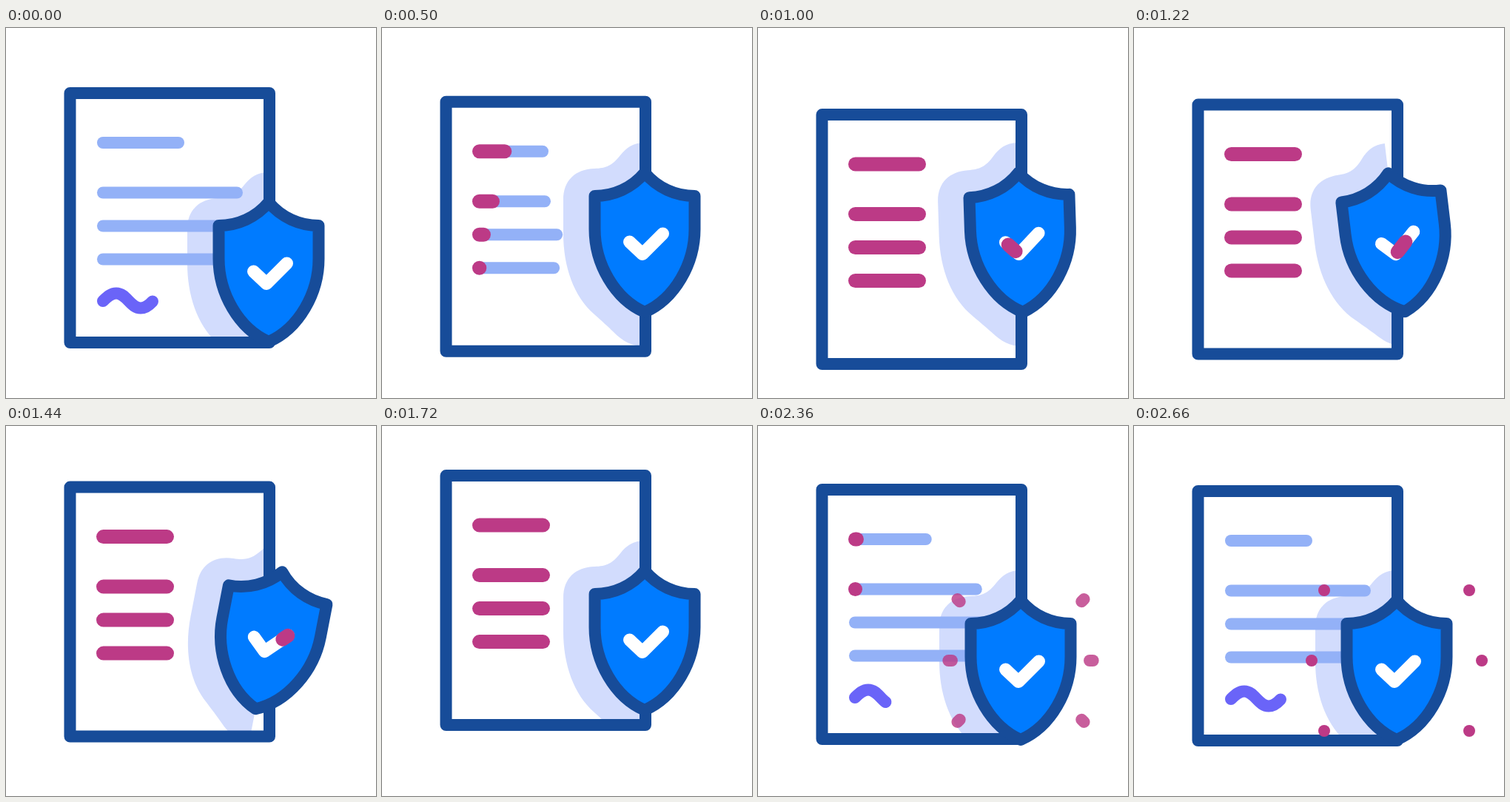
These frames come from a looping animation (500x500 px, 2680 ms). An HTML page:

```html
<!DOCTYPE html>
<html lang="en">
<head>
<meta charset="utf-8">
<title>Protected document</title>
<style>
  html, body { margin: 0; width: 100%; height: 100%; overflow: hidden; background: #fff; }
  svg { display: block; width: 100vw; height: 100vh; }
  path, line, rect { fill: none; stroke-linecap: round; stroke-linejoin: round; stroke-width: 16; }
  .frame { stroke: #174c99; }
  .paper { fill: #fff; }
  .halo { fill: #d2dcfd; }
  .text { stroke: #93b1f7; }
  .sign { stroke: #6a64f8; }
  .glow { stroke: #bc3a86; stroke-width: 19; }
  .spark { stroke: #bc3a86; }
  .shield { fill: #007bff; stroke: #174c99; }
  .tick { stroke: #fff; stroke-width: 17; }
</style>
</head>
<body>
<svg viewBox="0 0 500 500">
  <defs>
    <clipPath id="page"><rect id="pageBox" x="86.5" y="88" width="269.5" height="337"/></clipPath>
  </defs>
  <rect id="paper" class="paper" x="86.5" y="88" width="269.5" height="337"/>
  <g clip-path="url(#page)">
    <path id="halo" class="halo" d="M355 195C339 195 330 202 322 212C311 226 303 229.500 287 230C261 231 245 246 245 272V318C245 362 259 403 287 427C298 437 305 443 312 450C326 464 337 470 355 470Z"/>
  </g>
  <g id="doc">
    <g id="lines"></g>
    <path id="sign" class="sign" pathLength="1" d="M131 369C137 363 142 358.500 149 358.500C163 358.500 168 378.500 182 378.500C188 378.500 193 375 198 369.500"/>
    <rect class="frame" x="86.500" y="88" width="269.500" height="337"/>
  </g>
  <g id="badge">
    <path class="shield" d="M355 235.500C338 256 313 267 287.500 267V312C287.500 358 314 406 355 424C396 406 422.500 358 422.500 312V267C397 267 372 256 355 235.500Z"/>
    <path class="tick" d="M334.500 329L352 345.500L379.500 318"/>
    <path id="tickGlow" class="glow" pathLength="1" d="M334.500 329L352 345.500L379.500 318"/>
  </g>
  <g id="sparks"></g>
</svg>
<script>
const LOOP = 2680;
const $ = id => document.getElementById(id);

function set(el, attrs) {
  for (const k in attrs) el.setAttribute(k, attrs[k]);
}

function add(parent, tag, attrs) {
  const el = document.createElementNS('http://www.w3.org/2000/svg', tag);
  set(el, attrs);
  return parent.appendChild(el);
}

const clamp = v => Math.min(1, Math.max(0, v));
const wave = u => (1 - Math.cos(Math.PI * u)) / 2;
const ease = (t, from, to) => wave(clamp((t - from) / (to - from)));

// Rises to 1 at one time and falls back to 0 at another
const hold = (t, rise, fall, dur) => ease(t, rise, rise + dur) - ease(t, fall, fall + dur);

// Show only the part a..b of a path with pathLength 1
function trim(el, a, b) {
  el.style.visibility = b - a > 0.0001 ? 'visible' : 'hidden';
  set(el, { 'stroke-dasharray': `${Math.max(0, b - a)} 2`, 'stroke-dashoffset': -a });
}

// One swing right, left and right again, starting and ending at rest
function swing(t) {
  const u = 4 * clamp((t - 535) / 1200);
  return 11 * (u < 1 || u > 3 ? wave(u) : -Math.cos(Math.PI * u));
}

const lines = [233, 312, 312, 292].map((end, i) => {
  const y = i ? 177.5 + 45 * i : 155;
  return {
    end,
    text: add($('lines'), 'line', { class: 'text', x1: 131, y1: y, y2: y }),
    over: add($('lines'), 'path', { class: 'glow', pathLength: 1, d: `M131.5 ${y}H217.5` })
  };
});

// Three sparks on each side of the shield
const sparks = [];
for (const side of [-1, 1]) {
  for (const row of [-1, 0, 1]) {
    const x = side * (115 - 17 * Math.abs(row)), y = 95 * row;
    sparks.push({ x, y, start: 1 - 22 / Math.hypot(x, y), el: add($('sparks'), 'line', { class: 'spark' }) });
  }
}

function drawLine({ end, text, over }, i, t) {
  const short = hold(t, 180 + 55 * Math.min(i, 2), 2190 - 45 * i, 300);
  set(text, { x2: end + (217 - end) * short });
  trim(over, 0, hold(t, 279 + 68 * i, 1900 - 45 * i, 510));
}

function drawSpark({ x, y, start, el }, t) {
  const at = p => start + (1 - start) * p;
  const head = at(ease(t, 2289, 2525)), tail = at(ease(t, 2350, 2630));
  set(el, {
    x1: 355 + x * tail, y1: 317 + y * tail,
    x2: 355.01 + x * head, y2: 317 + y * head
  });
}

function draw(t) {
  const docY = 30 * ease(t, 176, 930) - 51 * ease(t, 930, 1745) + 21 * ease(t, 1745, 2515);
  for (const id of ['doc', 'paper', 'pageBox']) set($(id), { transform: `translate(0 ${docY})` });

  const pose = `translate(0 ${-40 * hold(t, 180, 2020, 280)}) rotate(${swing(t)} 355 331)`;
  for (const id of ['badge', 'halo']) set($(id), { transform: pose });

  lines.forEach((l, i) => drawLine(l, i, t));
  trim($('sign'), 0, 1 - hold(t, 180, 2185, 300));
  trim($('tickGlow'), ease(t, 860, 1636), ease(t, 720, 1496));

  set($('sparks'), { opacity: clamp((t - 2280) / 100) });
  sparks.forEach(s => drawSpark(s, t));
}

function tick(now) {
  draw(now % LOOP);
  requestAnimationFrame(tick);
}
draw(0);
requestAnimationFrame(tick);
</script>
</body>
</html>
```
